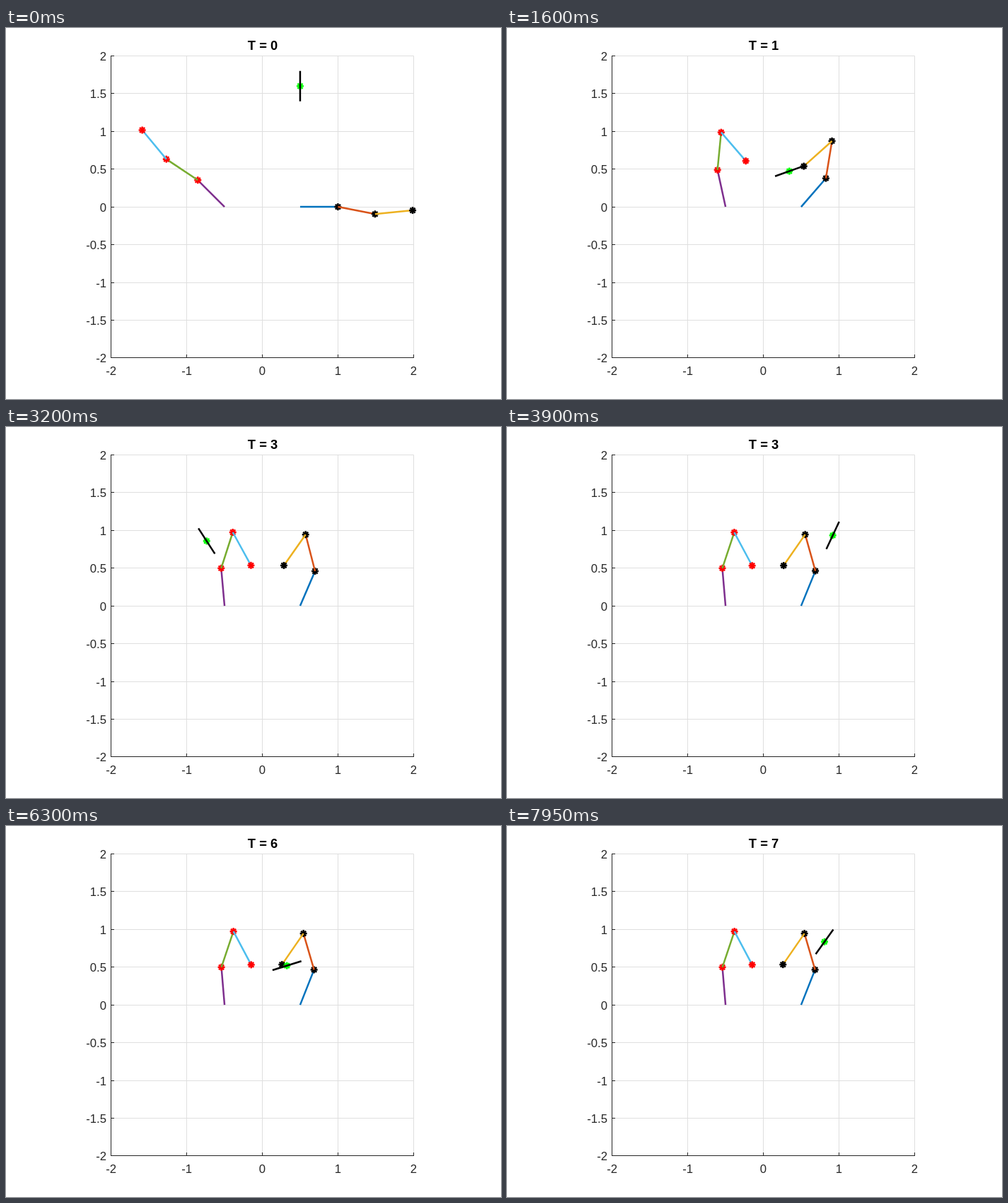
Animation, 700 px wide and 525 px high, one loop 8 s. Source, as an HTML page with a canvas:

```html
<!DOCTYPE html>
<html lang="en">
<head>
<meta charset="utf-8">
<title>Two arms and a stick</title>
<style>
html, body { margin: 0; width: 100%; height: 100%; overflow: hidden; background: #fff; }
canvas { display: block; width: 700px; height: 525px; }
</style>
</head>
<body>
<canvas id="stage" width="700" height="525"></canvas>
<script>
const ctx = document.getElementById('stage').getContext('2d');
const LOOP = 8000, STEP = 50, FOLD_TIME = 0.75, LINK = 0.5;
const UNIT = 106.9, RAD = Math.PI / 180;
const FONT = '"Liberation Sans", Arial, sans-serif';
const INK = '#262626', GRID = '#dfdfdf';
const px = x => 362.5 + UNIT * x;
const py = y => 253.1 - UNIT * y;

// Each link: absolute angle at the start, when folded and at rest,
// the sway while folding, and the time constant of coming to rest
const ARMS = [
  { base: 0.5, marker: '#000', links: [
    { color: '#0072bd', start: 0, fold: -3, rest: 68.4, sway: -24, tau: 0.65 },
    { color: '#d95319', start: -11, fold: 3.3, rest: 106.3, sway: -28, tau: 0.61 },
    { color: '#edb120', start: 5.6, fold: 158.6, rest: 235.4, sway: 36, tau: 0.49 }] },
  { base: -0.5, marker: '#f00', links: [
    { color: '#7e2f8e', start: 135, fold: 135.8, rest: 94.8, sway: 17, tau: 0.5 },
    { color: '#77ac30', start: 146.3, fold: 132.7, rest: 71.4, sway: 18, tau: 0.55 },
    { color: '#4dbeee', start: 129.7, fold: -5.4, rest: -62, sway: -24, tau: 0.57 }] }
];

function linkAngle({ start, fold, rest, sway, tau }, t) {
  if (t >= FOLD_TIME) return rest + (fold - rest) * Math.exp((FOLD_TIME - t) / tau);
  const u = t / FOLD_TIME;
  return start + (fold - start) * u * u * (3 - 2 * u) + sway * Math.sin(Math.PI * u);
}

// A slowly damped swing plus start-up terms that die out
function stickPose(t) {
  const fade = (value, rate, decay) => (value + rate * t) * Math.exp(-decay * t);
  const phase = Math.PI * (0.997 * t + 0.0044 * t * t - 0.046 + fade(0.046, 0.6, 2.4));
  const reach = 0.95 - 0.0147 * t + fade(-0.5, 2.9, 2.5);
  const d = reach * (1.04 * Math.cos(phase) - 0.04 * Math.cos(3 * phase));
  return {
    x: 0.05 + d,
    y: 0.45 + 0.615 * Math.abs(d) ** 1.7 + fade(0.99, -4.74, 3),
    angle: (62 * d + 17 * d ** 3 + 60.5 * Math.exp(-1.6 * t * t)) * RAD
  };
}

function line(x0, y0, x1, y1, color, width) {
  ctx.strokeStyle = color;
  ctx.lineWidth = width;
  ctx.beginPath();
  ctx.moveTo(x0, y0);
  ctx.lineTo(x1, y1);
  ctx.stroke();
}

const bar = (x0, y0, x1, y1, color) => line(px(x0), py(y0), px(x1), py(y1), color, 2.5);

function star(x, y, color) {
  const cx = px(x), cy = py(y);
  for (let k = 0; k < 4; k++) {
    const dx = 5 * Math.cos(k * Math.PI / 4), dy = 5 * Math.sin(k * Math.PI / 4);
    line(cx - dx, cy - dy, cx + dx, cy + dy, color, 2.5);
  }
}

function text(str, x, y, align, font, color) {
  ctx.font = font + ' ' + FONT;
  ctx.textAlign = align;
  ctx.fillStyle = color;
  ctx.fillText(str, x, Math.round(y));
}

function drawAxes(t) {
  const left = 148.5, right = 576.5, top = 39.5, bottom = 466.5;
  const snap = v => Math.floor(v) + 0.5;
  const rowY = v => Math.min(bottom, snap(py(v)));
  for (let v = -2; v <= 2; v++) line(snap(px(v)), top, snap(px(v)), bottom, GRID, 1);
  for (let v = -2; v <= 2; v += 0.5) line(left, rowY(v), right, rowY(v), GRID, 1);
  line(left, top - 0.5, left, bottom + 0.5, INK, 1);
  line(left, bottom, right + 0.5, bottom, INK, 1);
  for (let v = -2; v <= 2; v++) {
    const x = snap(px(v));
    line(x, bottom, x, bottom - 4.5, INK, 1);
    text(String(v), px(v), 491, 'center', '16.67px', INK);
  }
  for (let v = -2; v <= 2; v += 0.5) {
    line(left, rowY(v), left + 4.5, rowY(v), INK, 1);
    text(String(v), 142, py(v) + 6.5, 'right', '16.67px', INK);
  }
  text('T = ' + Math.floor(t), 363, 31, 'center', 'bold 18.33px', '#000');
}

function drawArm(arm, t) {
  let x = arm.base, y = 0;
  for (const link of arm.links) {
    const a = linkAngle(link, t) * RAD;
    const nx = x + LINK * Math.cos(a), ny = y + LINK * Math.sin(a);
    bar(x, y, nx, ny, link.color);
    star(nx, ny, arm.marker);
    x = nx;
    y = ny;
  }
}

function drawStick(t) {
  const { x, y, angle } = stickPose(t);
  const dx = 0.2 * Math.cos(angle), dy = 0.2 * Math.sin(angle);
  star(x, y, '#0f0');
  bar(x - dx, y - dy, x + dx, y + dy, '#000');
}

function draw(ms) {
  const t = Math.floor(ms % LOOP / STEP) * STEP / 1000;
  ctx.fillStyle = '#fff';
  ctx.fillRect(0, 0, 700, 525);
  drawAxes(t);
  ARMS.forEach(arm => drawArm(arm, t));
  drawStick(t);
}

const start = performance.now();
function tick() {
  draw(Math.max(0, performance.now() - start));
  requestAnimationFrame(tick);
}
tick();
</script>
</body>
</html>
```
